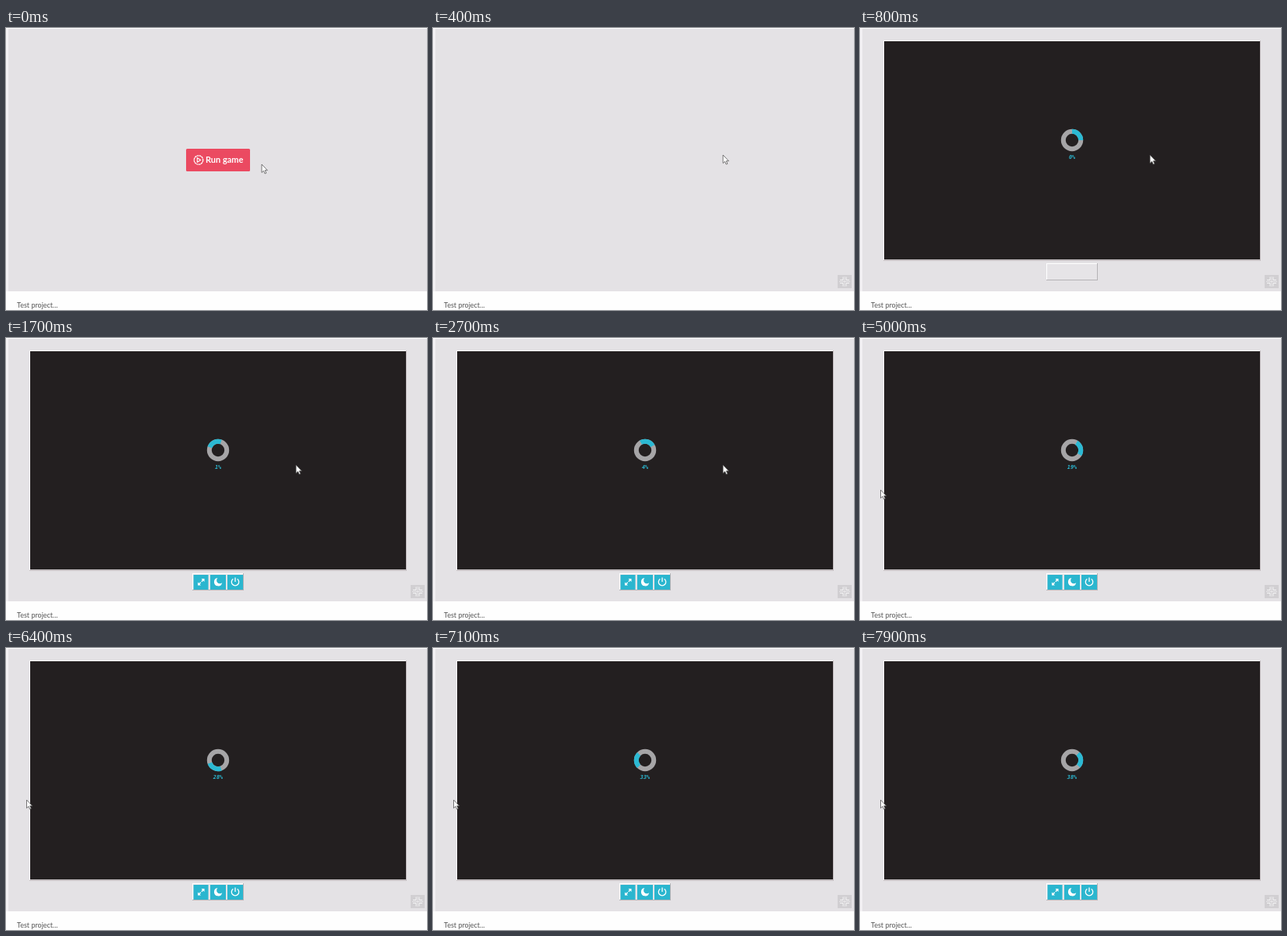
Recreate the animation shown at these times as an HTML page. Size 540 by 362 pixels, loop 8000 ms.

```html
<!DOCTYPE html>
<html lang="en">
<head>
<meta charset="utf-8">
<title>Game loader</title>
<style>
  html, body { margin: 0; width: 100%; height: 100%; overflow: hidden; background: #fff; }
  svg { display: block; }
  text { font-family: Lato, sans-serif; }
  #percent { font: italic bold 6.8px "DejaVu Sans Mono", monospace; fill: #2bb9d3; text-anchor: middle; }
  .tile { fill: #2bb6cf; }
  .line { fill: none; stroke: #fff; }
</style>
</head>
<body>
<svg width="540" height="362" viewBox="0 0 540 362">
  <rect width="540" height="362" fill="#fefefe"/>
  <rect y="1" width="3" height="337" fill="#f3f1f4"/>
  <rect x="3" y="1" width="537" height="337" fill="#e4e2e5"/>
  <text x="14" y="359" font-size="9" fill="#555">Test project...</text>

  <g id="run">
    <rect x="231" y="155" width="82" height="29" rx="1.5" fill="#eb4a61"/>
    <circle class="line" cx="247" cy="169.5" r="5.7" stroke-width="1.3" stroke-dasharray="2.6 .4"/>
    <path class="line" d="M245.3 166.8v5.4l4.4-2.7z" stroke-width="1.1"/>
    <text x="256" y="173" font-size="11" font-weight="bold" fill="#fff">Run game</text>
  </g>

  <g id="fullscreen">
    <rect x="519" y="317" width="18" height="17" fill="#d1cfd2"/>
    <path class="line" d="M522 323.500h4v-4M530 319.500v4h4M522 327.500h4v4M530 331.500v-4h4" stroke="#fff" opacity=".75"/>
    <path class="line" d="M528 319v13M521 325.500h14" opacity=".45"/>
  </g>

  <g id="game">
    <rect x="30" y="16" width="484" height="283" fill="#c5bfc2"/>
    <path d="M30 298V16H513V17H31V298z" fill="#faf9fa"/>
    <rect x="31" y="17" width="482" height="280" fill="#231f20"/>
    <circle cx="272" cy="144" r="11.200" fill="none" stroke="#a6a5a7" stroke-width="6"/>
    <path id="arc" d="M272 132.800a11.200 11.200 0 0 1 11.200 11.200" fill="none" stroke="#2bb9d3" stroke-width="6"/>
    <text id="percent" x="272" y="167.500"></text>

    <rect x="239" y="302" width="66" height="22" fill="#b5b3b6"/>
    <path d="M239 323V302H304V303H240V323z" fill="#fff"/>
    <rect x="240" y="303" width="64" height="20" fill="#e6e4e7"/>
    <g id="tools">
      <rect class="tile" x="240.500" y="304" width="19" height="19"/>
      <rect class="tile" x="262" y="304" width="20" height="19"/>
      <rect class="tile" x="284" y="304" width="20" height="19"/>
      <path d="M250.500 309h4v4zM246 313.500v4h4z" fill="#fff"/>
      <path class="line" d="M253.500 310l-2.700 2.700M247 316.500l2.700-2.700" stroke-width="1.400"/>
      <path d="M271.500 308a5.200 5.200 0 1 0 5.700 6.200a4.100 4.100 0 0 1-5.700-6.200z" fill="#fff"/>
      <path class="line" d="M291.300 309.300a4.700 4.700 0 1 0 5.400 0M294 307.500v5.500" stroke-width="1.300"/>
    </g>
  </g>

  <path id="arrow" d="M0 0V10.500L2.500 8.300L4.100 12L5.800 11.200L4.200 7.700H7.300z" fill="#fff" stroke="#555" stroke-width=".8"/>
  <path id="hand" d="M2 9V1q1-1.300 2 0v4l5 1v5l-1 3H4L0 9.500z" fill="#fff" stroke="#444" stroke-width=".8"/>
</svg>
<script>
const LOOP = 8000, STEP = 100;
const $ = id => document.getElementById(id);
const show = (id, on) => $(id).setAttribute("visibility", on ? "visible" : "hidden");

// Points are [time, ...values], interpolated linearly.
const progress = [[800, 0], [2200, 3], [2700, 4.3], [4100, 12.4], [5000, 19.3], [6400, 28.4], [7900, 38.3]];
const pointer = [[3700, 372, 163], [3800, 353, 165], [4000, 209, 179], [4100, 131.500, 186], [4200, 62, 192], [4300, 26.500, 195]];

function sample(points, t) {
  if (t <= points[0][0]) return points[0].slice(1);
  const i = points.findIndex(p => p[0] >= t);
  if (i < 0) return points.at(-1).slice(1);
  const a = points[i - 1], b = points[i], k = (t - a[0]) / (b[0] - a[0]);
  return a.slice(1).map((v, n) => v + (b[n + 1] - v) * k);
}

function arrowPosition(t) {
  return t < 100 ? [328, 175] : sample(pointer, t);
}

function draw() {
  const t = Math.floor(performance.now() % LOOP / STEP) * STEP;
  const overButton = t >= 100 && t < 400;

  show("run", t < 200);
  show("fullscreen", t >= 200);
  show("game", t >= 800);
  $("tools").setAttribute("display", t >= 1100 ? "inline" : "none");

  const [x, y] = arrowPosition(t);
  show("arrow", !overButton);
  show("hand", overButton);
  $("arrow").setAttribute("transform", `translate(${x} ${y})`);
  $("hand").setAttribute("transform", "translate(293.500 162.500)");

  $("arc").setAttribute("transform", `rotate(${(t - 800) * 1.1215} 272 144)`);
  $("percent").textContent = Math.floor(sample(progress, t)[0]) + "%";
  requestAnimationFrame(draw);
}
draw();
</script>
</body>
</html>
```
